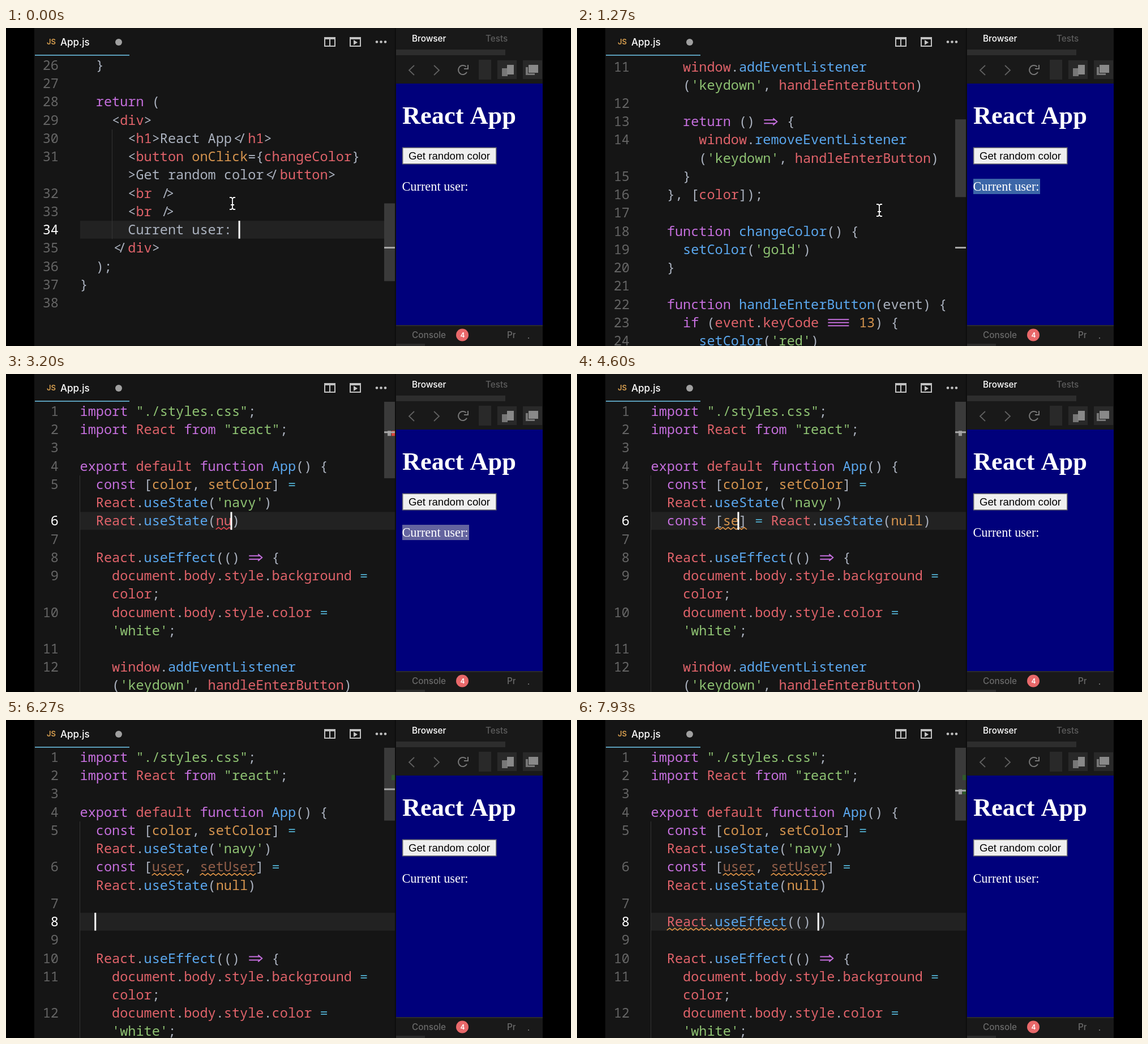
Animation of 998 by 561 pixels, one loop 8 s. Source, as an HTML page with a canvas:

```html
<!DOCTYPE html>
<html lang="en">
<head>
<meta charset="utf-8">
<title>Code editor</title>
<style>
  html, body { margin: 0; width: 100%; height: 100%; overflow: hidden; background: #000; }
  canvas { display: block; }
</style>
</head>
<body>
<canvas id="stage" width="998" height="561"></canvas>
<script>
const ctx = document.getElementById('stage').getContext('2d');
const LOOP = 8000;
const LEFT = 130.5, CHAR = 14.13, ROW = 32.23, TOP = 50;
const MONO = '500 23.55px "Noto Sans Mono", monospace';
const UI = 'Inter, sans-serif';
const WARNING = '#dc9145', ERROR = '#e0454c';

// A mark in front of a token chooses its colour; a leading + continues the line above.
const COLORS = {
  '': '#abb2bf', '|': '#abb2bf', '^': '#c56fdd', '~': '#5ba8ef', '%': '#e0636a',
  '@': '#d6954f', '$': '#8fc373', '#': '#4fa9c9', '!': '#94604a'
};
const HEAD = [
  '^import $"./styles.css"|;',
  '^import %React ^from $"react"|;',
  '',
  '^export %default ^function ~App|() {',
  '  ^const |[@color|, @setColor|] #=',
  "+  %React|.~useState|($'navy'|)"
];
const TAIL = [
  '',
  '  %React|.~useEffect|(() ^=> |{',
  '    %document|.%body|.%style|.%background #=',
  '+    %color|;',
  '    %document|.%body|.%style|.%color #=',
  "+    $'white'|;",
  '',
  '    %window|.~addEventListener',
  "+    |($'keydown'|, %handleEnterButton|)",
  '',
  '    ^return |() ^=> |{',
  '      %window|.~removeEventListener',
  "+      |($'keydown'|, %handleEnterButton|)",
  '    |}',
  '  |}, [%color|]);',
  '',
  '  ^function ~changeColor|() {',
  "    ~setColor|($'gold'|)",
  '  |}',
  '',
  '  ^function ~handleEnterButton|(event) {',
  '    ^if |(%event|.%keyCode ^=== @13|) {',
  "      ~setColor|($'red'|)",
  '    |}',
  '  |}',
  '',
  '  ^return |(',
  '    |<%div|>',
  '      |<%h1|>React App</%h1|>',
  '      |<%button @onClick|={%changeColor|}',
  '+      |>Get random color</%button|>',
  '      |<%br |/>',
  '      |<%br |/>',
  '      |Current user: ',
  '    |</%div|>',
  '  |);',
  '|}',
  ''
];

const SCROLL = [[870, 30], [1130, 14.5], [1200, 14.5], [1270, 12.92], [1530, 0]];
const MOUSE = [
  [0, 400, 309], [330, 826, 281], [400, 826, 281], [670, 697, 281],
  [870, 534, 321], [1600, 534, 321], [1870, 500, 228]
];

function along(points, t) {
  const next = points.findIndex(p => p[0] > t);
  if (next === 0) return points[0].slice(1);
  if (next < 0) return points[points.length - 1].slice(1);
  const a = points[next - 1], b = points[next];
  const k = (t - a[0]) / (b[0] - a[0]);
  return a.slice(1).map((v, i) => v + (b[i + 1] - v) * k);
}

function typed(text, from, to, t) {
  if (t < from) return '';
  const k = Math.min(1, (t - from) / (to - from));
  return text.slice(0, 1 + Math.floor(k * (text.length - 1) + 1e-6));
}

const count = (text, ch) => text.split(ch).length - 1;
const closeParens = text => text + ')'.repeat(count(text, '(') - count(text, ')'));

function highlight(text, nameMark = '@') {
  return text.replace(/\w+|=|[^\w=]+/g, (w, i) => {
    if (w === '=') return '#=';
    if (!/\w/.test(w)) return '|' + w;
    if (w === 'const') return '^' + w;
    if (w === 'null') return '@' + w;
    if (i > text.indexOf('[') && i < text.indexOf(']')) return nameMark + w;
    return (text[i + w.length] === '(' ? '~' : '%') + w;
  });
}

function stateNames(t) {
  if (t < 4400) return '';
  if (t < 4600) return 's';
  if (t < 4670) return 'se';
  if (t < 4730) return 's';
  return typed('user', 4800, 4930, t) + typed(', setUser', 5130, 5730, t);
}

// Rows typed below line 5, with caret, squiggles and overview marks.
function editing(t) {
  const edit = { rows: [], squiggles: [], marked: false };
  if (t < 1870) return { ...edit, caret: [39, 20], caretOn: t < 270 };
  edit.caretOn = true;
  if (t < 2000) return { ...edit, caret: [5, 24] };

  const callText = typed('React.useState(nu', 2530, 3190, t) + typed('ll', 3270, 3330, t);
  const names = stateNames(t);
  const prefix = typed('const ', 3470, 3930, t) + (t >= 4070 ? `[${names}]` : '') +
    typed(' = ', 4130, 4270, t);
  const line = '  ' + prefix + closeParens(callText);
  const nameMark = t < 5870 ? '@' : '!';
  if (line.length > 38) {
    const cut = line.indexOf('= ') + 1;
    edit.rows.push(highlight(line.slice(0, cut), nameMark), '+' + highlight('  ' + line.slice(cut + 1)));
  } else {
    edit.rows.push(highlight(line, nameMark));
  }

  if (t < 3400) edit.caret = [6, 2 + callText.length];
  else if (t < 4330) edit.caret = [6, 2 + prefix.length];
  else if (t < 5800) edit.caret = [6, 9 + names.length];
  else edit.caret = [7, 22];
  edit.marked = callText && t < 6000;

  if (t >= 3130 && t < 3330) edit.squiggles.push([6, 17, callText.length - 15, ERROR]);
  if (t >= 4200 && t < 5130) edit.squiggles.push([6, 8, names.length + 2, WARNING]);
  if (t >= 5870) edit.squiggles.push([6, 9, 4, WARNING], [6, 15, 7, WARNING]);

  if (t >= 6000) {
    edit.rows.push('');
    edit.caret = [8, 2];
  }
  if (t >= 6200) {
    const effect = typed('React.u', 6400, 6800, t) + typed('se', 6870, 6930, t) +
      typed('Effect(() ', 7130, 7930, t);
    edit.rows.push(highlight('  ' + closeParens(effect)));
    edit.caret = [9, 2 + effect.length];
    edit.marked = effect;
    if (t >= 6700) edit.squiggles.push([9, 2, Math.min(15, effect.length), WARNING]);
  }
  return edit;
}

function box(color, x, y, w, h) {
  ctx.fillStyle = color;
  ctx.fillRect(x, y, w, h);
}
function label(text, x, y, font, color) {
  ctx.font = font;
  ctx.fillStyle = color;
  ctx.fillText(text, x, y);
}
function stroke(color, width, ...paths) {
  ctx.strokeStyle = color;
  ctx.lineWidth = width;
  ctx.beginPath();
  for (const path of paths) {
    path.forEach(([x, y], i) => i ? ctx.lineTo(x, y) : ctx.moveTo(x, y));
  }
  ctx.stroke();
}
function disc(color, x, y, r) {
  ctx.fillStyle = color;
  ctx.beginPath();
  ctx.arc(x, y, r, 0, 7);
  ctx.fill();
}

function drawPiece(text, x, y, color) {
  const mid = y - 8;
  const bar = (dy, from, to) => [[x + from, mid + dy], [x + to, mid + dy]];
  if (text === '=>') {
    stroke(color, 2, bar(-3, 2, 22), bar(3, 2, 22), [[x + 18, mid - 6], [x + 25, mid], [x + 18, mid + 6]]);
  } else if (text === '===') {
    stroke(color, 2, bar(-5.5, 2, 39), bar(0, 2, 39), bar(5.5, 2, 39));
  } else if (text === '</' || text === '/>') {
    label(text[0], x + 3, y, MONO, color);
    label(text[1], x + CHAR - 3, y, MONO, color);
  } else {
    label(text, x, y, MONO, color);
  }
}

function drawCode(row, y) {
  let x = LEFT;
  for (const [, mark, token] of row.matchAll(/([\^~%@$#|!]?)([^\^~%@$#|!]+)/g)) {
    for (const piece of token.split(/(<\/|\/>|===|=>)/)) {
      if (piece) drawPiece(piece, x, y, COLORS[mark]);
      x += piece.length * CHAR;
    }
  }
}

function drawSquiggle(row, col, length, color) {
  const start = LEFT + col * CHAR, y = TOP + row * ROW + 29;
  const points = [];
  for (let x = 0; x <= length * CHAR; x += 4.7) {
    points.push([start + x, y + (points.length % 2 ? -1.8 : 1.8)]);
  }
  stroke(color, 1.6, points);
}

function drawOverview(edit, scroll, rowCount) {
  const unit = 8.68 * 59 / (rowCount + 15);
  const y = 49 + edit.caret[0] * unit;
  box('#3a3a3a', 668, 49 + scroll * unit, 19, unit * 15.8);
  if (rowCount > 46 && edit.squiggles.length) box('#2f5a2b', 681, 97, 6, 9);
  if (edit.marked) {
    box('#9a9a9a', 674, y, 6, 9);
    const color = edit.squiggles.some(s => s[3] === ERROR) ? '#d8443c' :
      edit.caret[0] === 9 ? '#2f5a2b' : '';
    if (color) box(color, 681, y, 6, 9);
  }
  box('#a8a8a8', 668, edit.marked ? y + 1 : y - 1.5, 19, 3);
}

function drawEditor(t) {
  const edit = editing(t);
  const [scroll] = along(SCROLL, t);
  const rows = [...HEAD, ...edit.rows, ...TAIL];
  const [caretRow, caretCol] = edit.caret;

  ctx.save();
  ctx.beginPath();
  ctx.rect(51, 49, 636, 512);
  ctx.clip();
  ctx.save();
  ctx.translate(0, -scroll * ROW);
  box('#222', 131, TOP + caretRow * ROW, 556, 31.5);
  if (t < 1870) box('#333', 187, TOP + 34 * ROW, 1, 6 * ROW);
  else box('#333', 130, TOP + 4 * ROW, 1, 45 * ROW);

  let activeRow = caretRow;
  while (rows[activeRow][0] === '+') activeRow--;
  let number = 0;
  rows.forEach((row, i) => {
    const y = TOP + 24 + i * ROW;
    const continued = row[0] === '+';
    if (!continued) {
      ctx.textAlign = 'right';
      label(++number, 93, y, MONO, i === activeRow ? '#fff' : '#656565');
      ctx.textAlign = 'left';
    }
    drawCode(continued ? row.slice(1) : row, y);
  });
  edit.squiggles.forEach(s => drawSquiggle(...s));
  if (edit.caretOn) box('#fff', LEFT + caretCol * CHAR - 2.5, TOP + caretRow * ROW, 3, 31.5);
  ctx.restore();
  drawOverview(edit, scroll, rows.length);
  ctx.restore();
}

function drawEditorHeader() {
  box('#151515', 50, 0, 638, 561);
  box('#5a9cb8', 51, 47, 167, 2);
  label('JS', 72, 29, `600 13px ${UI}`, '#d9a050');
  label('App.js', 96, 31, `500 17px ${UI}`, '#fff');
  disc('#a0a0a0', 199, 25, 6);
  ctx.strokeStyle = '#c2c2c2';
  ctx.lineWidth = 2;
  ctx.strokeRect(563, 17, 18, 15);
  ctx.strokeRect(608, 17, 18, 15);
  box('#c2c2c2', 562, 16, 20, 4);
  box('#c2c2c2', 607, 16, 20, 4);
  box('#c2c2c2', 571, 17, 2, 15);
  ctx.beginPath();
  ctx.moveTo(614, 21);
  ctx.lineTo(621, 25.5);
  ctx.lineTo(614, 30);
  ctx.fill();
  for (const x of [655, 662.5, 670]) disc('#c2c2c2', x, 24.5, 2.3);
}

function drawBrowser(t) {
  box('#191919', 688, 0, 260, 561);
  box('#0a0a0a', 687, 0, 1.5, 561);
  label('Browser', 717, 24, `500 15.3px ${UI}`, '#fff');
  label('Tests', 847, 24, `500 15.3px ${UI}`, '#5c5c5c');
  box('#2d2d2d', 689, 38, 193, 10);

  stroke('#606060', 1.8, [[721, 66], [712, 74.5], [721, 83]], [[756, 66], [765, 74.5], [756, 83]]);
  ctx.strokeStyle = '#777';
  ctx.lineWidth = 2;
  ctx.beginPath();
  ctx.arc(807, 74, 8, 0.5, 5.5);
  ctx.stroke();
  stroke('#777', 2, [[816, 65], [816, 72], [809, 72]]);
  box('#292929', 835, 56, 22, 35);
  box('#292929', 868, 57, 34, 33);
  box('#292929', 913, 57, 34, 33);
  box('#777', 876, 71, 10, 14);
  box('#898989', 885, 65, 12, 17);
  box('#777', 918, 69, 16, 14);
  box('#292929', 922, 64, 19, 16);
  box('#898989', 923, 65, 17, 14);

  box('#00007b', 689, 98, 259, 426);
  label('React App', 700, 169, 'bold 44.4px "Liberation Serif", serif', '#fff');
  box('#777', 700, 210.5, 166.5, 30);
  box('#efefef', 701.5, 212, 163.5, 27);
  label('Get random color', 711, 231.5, '18.65px "Liberation Sans", sans-serif', '#000');
  if (t >= 470 && t < 4330) {
    const start = Math.max(700, t < 670 ? along(MOUSE, t)[0] : 700);
    box(t < 1870 ? '#3c66a8' : '#64649f', start, 266, 818 - start, 27);
  }
  label('Current user:', 699.5, 287, '22.3px "Liberation Serif", serif', '#fff');

  box('#2b2b2b', 689, 524, 259, 2);
  label('Console', 717, 547, `500 15.3px ${UI}`, '#6a6a6a');
  disc('#e8686a', 806, 541.5, 11);
  label('4', 802.5, 546, `600 12px ${UI}`, '#fff');
  ctx.save();
  ctx.beginPath();
  ctx.rect(880, 527, 20, 30);
  ctx.clip();
  label('Pr', 885, 547, `500 15.3px ${UI}`, '#6a6a6a');
  ctx.restore();
  box('#6a6a6a', 922, 546, 2, 2);
  box('#2d2d2d', 689, 557, 51, 4);
}

function drawMouse(t) {
  if (t >= 2000) return;
  const [x, y] = along(MOUSE, t);
  const beam = [
    [[x - 5, y - 10], [x - 2, y - 10], [x, y - 8], [x + 2, y - 10], [x + 5, y - 10]],
    [[x, y - 8], [x, y + 9]],
    [[x - 5, y + 11], [x - 2, y + 11], [x, y + 9], [x + 2, y + 11], [x + 5, y + 11]],
    [[x - 3, y + 3], [x + 3, y + 3]]
  ];
  stroke('#111', 4, ...beam);
  stroke('#fff', 1.8, ...beam);
}

function frame(now) {
  const step = Math.floor((now % LOOP + 3.4) * 15 / 1000) % 120;
  const t = Math.round(step * 20 / 3) * 10;
  box('#000', 0, 0, 998, 561);
  drawEditorHeader();
  drawEditor(t);
  drawBrowser(t);
  drawMouse(t);
  requestAnimationFrame(frame);
}
requestAnimationFrame(frame);
</script>
</body>
</html>
```
